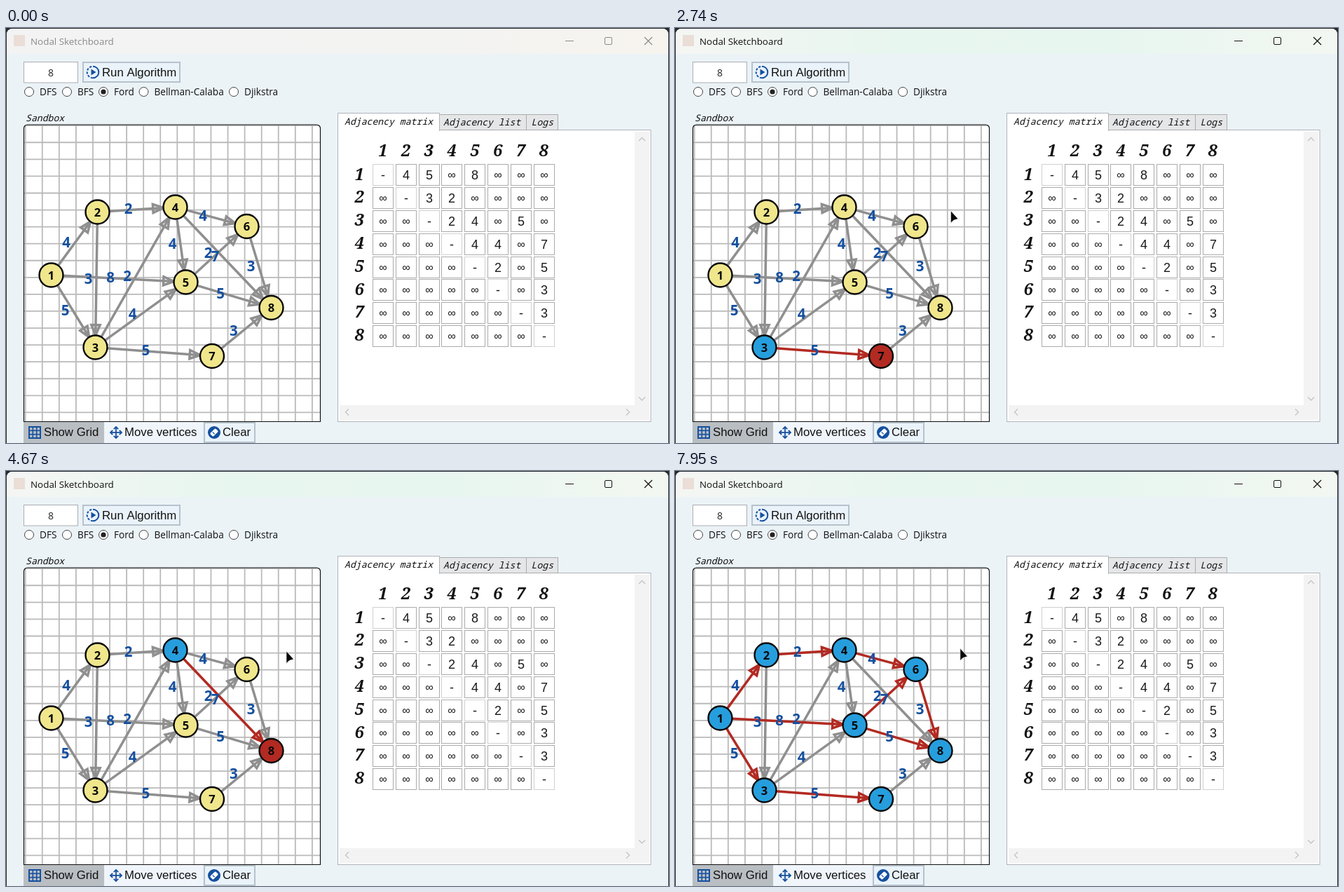
Animation, 946 px wide and 592 px high, one loop 8 s. Source, as an HTML page with a canvas:

```html
<!DOCTYPE html>
<html lang="en">
<head>
<meta charset="utf-8">
<title>Nodal Sketchboard</title>
<style>
html, body { margin: 0; width: 100%; height: 100%; overflow: hidden; background: #24272b; }
canvas { display: block; }
</style>
</head>
<body>
<canvas id="stage" width="946" height="592"></canvas>
<script>
const ctx = document.getElementById('stage').getContext('2d');
const LOOP = 8000, ACTIVE_FROM = 1920;
const SCAN_START = 1925, SCAN_STEP = 106, SCAN_ROUNDS = 2;
const SANS = '"Liberation Sans", Arial, sans-serif';
const UI = '"Open Sans", "Noto Sans", sans-serif';
const MONO = '"Noto Sans Mono", "Liberation Mono", monospace';
const SERIF = '"Noto Serif", serif';
const BLUE = '#15509f', HOVER = '#b9bec3';
const YELLOW = [240, 230, 140], VISIT = [38, 158, 221], RED = [178, 42, 34], GREY = [143, 143, 143];

const nodes = [[64.5, 352.5], [130.5, 262.5], [127.5, 455.5], [241.5, 255.5],
  [256.5, 362.5], [343.5, 283], [294, 468], [378.5, 399]];
// from, to, weight
const edges = ['124', '135', '158', '233', '242', '342', '354', '375',
  '454', '464', '487', '562', '585', '683', '783']
  .map(s => ({ id: s.slice(0, 2), from: +s[0] - 1, to: +s[1] - 1, weight: s[2] }));
const weights = new Map(edges.map(e => [e.id, e.weight]));
// when each vertex or edge of the shortest paths lights up
const reveal = { 1: 5500, 15: 5600, 5: 5700, 58: 5780, 8: 5850, 56: 5990, 6: 6120, 68: 6240,
  12: 6530, 2: 6650, 24: 6850, 4: 6970, 46: 7100, 13: 7580, 3: 7690, 37: 7790, 7: 7885 };
// time, x, y
const cursorPath = [[560, 946, 590], [820, 508, 576], [900, 496, 572], [1060, 350, 567],
  [1170, 291, 563], [1280, 284, 500], [1600, 220, 66], [1740, 216, 60], [1930, 215, 60],
  [2080, 218, 66], [2500, 380, 245], [2610, 393, 261], [3480, 396, 259],
  [4670, 400, 257], [6090, 403, 255], [8000, 407, 253]];

const rgb = c => `rgb(${c.map(Math.round).join()})`;

function text(str, x, y, font, color = '#111', align = 'left') {
  ctx.font = font;
  ctx.fillStyle = color;
  ctx.textAlign = align;
  ctx.fillText(str, x, y);
}

function box(x, y, w, h, fill, stroke, line = 1) {
  if (fill) { ctx.fillStyle = fill; ctx.fillRect(x, y, w, h); }
  if (stroke) { ctx.strokeStyle = stroke; ctx.lineWidth = line; ctx.strokeRect(x, y, w, h); }
}

function poly(points, stroke, line, fill, close = !!fill) {
  ctx.beginPath();
  points.forEach(([x, y], i) => i ? ctx.lineTo(x, y) : ctx.moveTo(x, y));
  if (close) ctx.closePath();
  if (fill) { ctx.fillStyle = fill; ctx.fill(); }
  if (stroke) { ctx.strokeStyle = stroke; ctx.lineWidth = line; ctx.stroke(); }
}

function disc(x, y, r, fill, stroke, line = 1) {
  ctx.beginPath();
  ctx.arc(x, y, r, 0, Math.PI * 2);
  if (fill) { ctx.fillStyle = fill; ctx.fill(); }
  if (stroke) { ctx.strokeStyle = stroke; ctx.lineWidth = line; ctx.stroke(); }
}

function scannedEdge(t) {
  const step = Math.floor((t - SCAN_START) / SCAN_STEP);
  return step >= 0 && step < edges.length * SCAN_ROUNDS ? edges[step % edges.length] : null;
}

function nodeTarget(i, t) {
  const e = scannedEdge(t);
  if (e) return i === e.from ? VISIT : i === e.to ? RED : YELLOW;
  return t >= reveal[i + 1] ? VISIT : YELLOW;
}

// averages the recent past, which gives a short linear fade
function nodeColor(i, t) {
  const sum = [0, 0, 0];
  for (let k = 0; k < 7; k++) nodeTarget(i, t - k * 10).forEach((v, c) => sum[c] += v / 7);
  return rgb(sum);
}

function cursorAt(t) {
  if (t < cursorPath[0][0]) return null;
  const i = cursorPath.findIndex(p => p[0] > t);
  const [t0, x0, y0] = cursorPath[i - 1], [t1, x1, y1] = cursorPath[i];
  const f = (t - t0) / (t1 - t0);
  return { x: x0 + (x1 - x0) * f, y: y0 + (y1 - y0) * f };
}

const over = (p, x, y, w, h) => !!p && p.x >= x && p.x <= x + w && p.y >= y && p.y <= y + h;

function drawWindow(active) {
  box(0, 0, 946, 592, '#24272b');
  ctx.beginPath();
  ctx.roundRect(1, 1, 944, 600, 8);
  ctx.fillStyle = '#ebf3f7';
  ctx.fill();
  ctx.save();
  ctx.clip();
  const bar = ctx.createLinearGradient(0, 0, 946, 0);
  const stops = active ? ['#f5f6f4', '#e7f6ee', '#e8f6f0', '#f3f7f1'] : ['#f3f3f3', '#f3f3f3', '#f3f3f2', '#f7f4ee'];
  stops.forEach((c, i) => bar.addColorStop(i / 3, c));
  box(0, 0, 946, 37, bar);
  ctx.restore();
  box(11, 10, 16, 16, '#eaded6');
  const ink = active ? '#111' : '#8a8a8a';
  text('Nodal Sketchboard', 35, 24, `13.4px ${UI}`, ink);
  poly([[798, 18.5], [810, 18.5]], ink, 1);
  ctx.beginPath();
  ctx.roundRect(854.5, 13.5, 10, 10, 1.5);
  ctx.stroke();
  poly([[911, 13], [922, 24]], ink, 1.2);
  poly([[922, 13], [911, 24]], ink, 1.2);
}

function drawTop(hover) {
  box(25.5, 48.5, 77, 29.5, '#fff', '#abadb3');
  text('8', 64, 69, `14px ${UI}`, '#222', 'center');
  box(110, 49, 138, 28, hover ? HOVER : '#eaf3fa', hover ? HOVER : '#b6c2cb', 2);
  ctx.strokeStyle = BLUE;
  ctx.lineWidth = 2;
  ctx.beginPath();
  ctx.arc(124, 63, 8.3, -Math.PI / 2, Math.PI / 2);
  ctx.stroke();
  ctx.setLineDash([3.2, 2]);
  ctx.beginPath();
  ctx.arc(124, 63, 8.3, Math.PI / 2, Math.PI * 1.5);
  ctx.stroke();
  ctx.setLineDash([]);
  poly([[121.5, 58.5], [128.5, 63], [121.5, 67.5]], null, 0, BLUE);
  text('Run Algorithm', 137, 69, `16.8px ${SANS}`);
  [['DFS', 33], ['BFS', 87], ['Ford', 139], ['Bellman-Calaba', 196.5], ['Djikstra', 325]].forEach(([label, x]) => {
    disc(x, 91, 6.5, '#fff', '#444');
    if (label === 'Ford') disc(x, 91, 3.6, '#222');
    text(label, x + 15, 96, `13.6px ${UI}`);
  });
}

function drawBottom(hover) {
  box(25, 562, 115, 30, HOVER);
  box(141, 562, 139, 30, '#f0f5fb');
  box(33, 569, 16, 16, null, BLUE, 2);
  for (const d of [5.3, 10.7]) {
    poly([[33 + d, 569], [33 + d, 585]], BLUE, 1.6);
    poly([[33, 569 + d], [49, 569 + d]], BLUE, 1.6);
  }
  text('Show Grid', 54, 582, `16.8px ${SANS}`);
  for (let i = 0; i < 4; i++) {
    ctx.save();
    ctx.translate(157, 577);
    ctx.rotate(i * Math.PI / 2);
    poly([[0, 0], [7, 0]], BLUE, 1.8);
    poly([[4.8, -3.2], [8, 0], [4.8, 3.2]], BLUE, 1.8);
    ctx.restore();
  }
  text('Move vertices', 169, 582, `16.8px ${SANS}`);
  box(283, 563, 72, 28, hover ? HOVER : '#eaf3fa', hover ? HOVER : '#b6c2cb', 2);
  disc(297, 577, 9, BLUE);
  ctx.save();
  ctx.translate(297, 577);
  ctx.rotate(-Math.PI / 4);
  ctx.beginPath();
  ctx.roundRect(-5.5, -3.2, 11, 6.4, 1.5);
  ctx.fillStyle = '#fff';
  ctx.fill();
  box(-1.8, -2, 1.2, 4, BLUE);
  ctx.restore();
  text('Clear', 309, 582, `16.8px ${SANS}`);
}

// a line that ends in a hollow, closed arrowhead
function drawEdge(e, color) {
  const [x0, y0] = nodes[e.from], [x1, y1] = nodes[e.to];
  const tip = Math.hypot(x1 - x0, y1 - y0) - 17;
  ctx.save();
  ctx.translate(x0, y0);
  ctx.rotate(Math.atan2(y1 - y0, x1 - x0));
  poly([[tip - 14.8, -6.1], [tip, 0], [tip - 14.8, 6.1]], color, 3.5, null, true);
  poly([[16, 0], [tip, 0]], color, 3.5);
  ctx.restore();
}

function drawSandbox(t) {
  text('Sandbox', 28, 133, `italic 13.15px ${MONO}`);
  ctx.beginPath();
  ctx.roundRect(25.5, 138, 423, 423.5, [5, 5, 0, 0]);
  ctx.fillStyle = '#fff';
  ctx.fill();
  ctx.save();
  ctx.clip();
  for (let k = 0; k < 18; k++) {
    const x = 27.7 + 24.07 * k, y = 139.2 + 24.07 * k;
    poly([[x, 138], [x, 562]], '#bababa', 1.8);
    poly([[25, y], [449, y]], '#bababa', 1.8);
  }
  ctx.restore();
  ctx.strokeStyle = '#111';
  ctx.lineWidth = 1.2;
  ctx.beginPath();
  ctx.roundRect(25.5, 138, 423, 423.5, [5, 5, 0, 0]);
  ctx.stroke();

  const scanned = scannedEdge(t);
  const isRed = e => e === scanned || t >= reveal[e.id];
  edges.filter(e => !isRed(e)).forEach(e => drawEdge(e, rgb(GREY)));
  edges.filter(isRed).forEach(e => drawEdge(e, rgb(RED)));
  for (const e of edges) {
    const [x0, y0] = nodes[e.from], [x1, y1] = nodes[e.to];
    text(e.weight, (x0 + x1) / 2 - 11.5, (y0 + y1) / 2 + 5.5, `bold 20.5px ${UI}`, BLUE, 'center');
  }
  nodes.forEach(([x, y], i) => {
    disc(x, y, 17, nodeColor(i, t), '#080808', 2.4);
    text(i + 1, x, y + 6, `bold 16.5px ${UI}`, '#080808', 'center');
  });
}

function drawMatrix() {
  box(473.5, 145.5, 446.5, 416, '#fff', '#b0b3b8');
  box(618.5, 123.5, 124, 22, '#e4e6e8', '#acacac');
  box(742.5, 123.5, 45, 22, '#e4e6e8', '#acacac');
  box(473.5, 121.5, 145, 25, '#fff', '#b0b3b8');
  box(474, 145, 144, 3, '#fff');
  [['Adjacency matrix', 483, 137.5], ['Adjacency list', 624, 138.5], ['Logs', 749.5, 138.5]]
    .forEach(([s, x, y]) => text(s, x, y, `italic 13.15px ${MONO}`));

  box(897, 148, 21, 411, '#f3f3f3');
  box(476, 538, 421, 21, '#f3f3f3');
  const arrow = '#c3c3c3';
  poly([[903, 161], [907.5, 156.5], [912, 161]], arrow, 1.3);
  poly([[903, 526.5], [907.5, 531], [912, 526.5]], arrow, 1.3);
  poly([[489, 543.5], [484.5, 548], [489, 552.5]], arrow, 1.3);
  poly([[885, 543.5], [889.5, 548], [885, 552.5]], arrow, 1.3);

  for (let r = 0; r < 8; r++) {
    const p = r * 32.8, head = `italic bold 23.5px ${SERIF}`;
    text(r + 1, 537.5 + p, 183, head, '#111', 'center');
    text(r + 1, 504, 216.5 + p, head, '#111', 'center');
    for (let c = 0; c < 8; c++) {
      const x = Math.round(523 + c * 32.8) + .5, y = Math.round(194.3 + p) + .5;
      box(x, y, 29, 30, '#fff', r === c ? '#d0d0d0' : '#ababab');
      const value = r === c ? '-' : weights.get(`${r + 1}${c + 1}`) || '∞';
      const size = value === '∞' ? 16 : 18;
      text(value, x + 14.5, y + (value === '∞' ? 20.5 : 21.5), `${size}px ${SANS}`, '#1a1a1a', 'center');
    }
  }
}

function drawCursor(p, hand) {
  ctx.save();
  ctx.translate(p.x, p.y);
  if (hand) {
    const shape = [[-2, 0], [0, -1], [2, 1], [2.5, 6], [7, 7], [9, 9], [8, 14], [6, 17], [-1, 17], [-5, 11], [-4, 9], [-1, 10]];
    poly(shape, '#fff', 1, '#080808');
  } else {
    poly([[0, 0], [0, 17.5], [4, 13.5], [10.5, 11.5]], '#fff', .6, '#080808');
  }
  ctx.restore();
}

function draw(t) {
  const cursor = cursorAt(t);
  const onRun = over(cursor, 109, 48, 140, 30);
  const onClear = over(cursor, 282, 562, 74, 30);
  const onMove = over(cursor, 141, 562, 139, 30);
  drawWindow(t >= ACTIVE_FROM);
  drawTop(onRun);
  drawSandbox(t);
  drawBottom(onClear);
  drawMatrix();
  if (cursor) drawCursor(cursor, onRun || onClear || onMove);
}

const start = performance.now();
function frame() {
  draw((performance.now() - start) % LOOP);
  requestAnimationFrame(frame);
}
frame();
</script>
</body>
</html>
```
